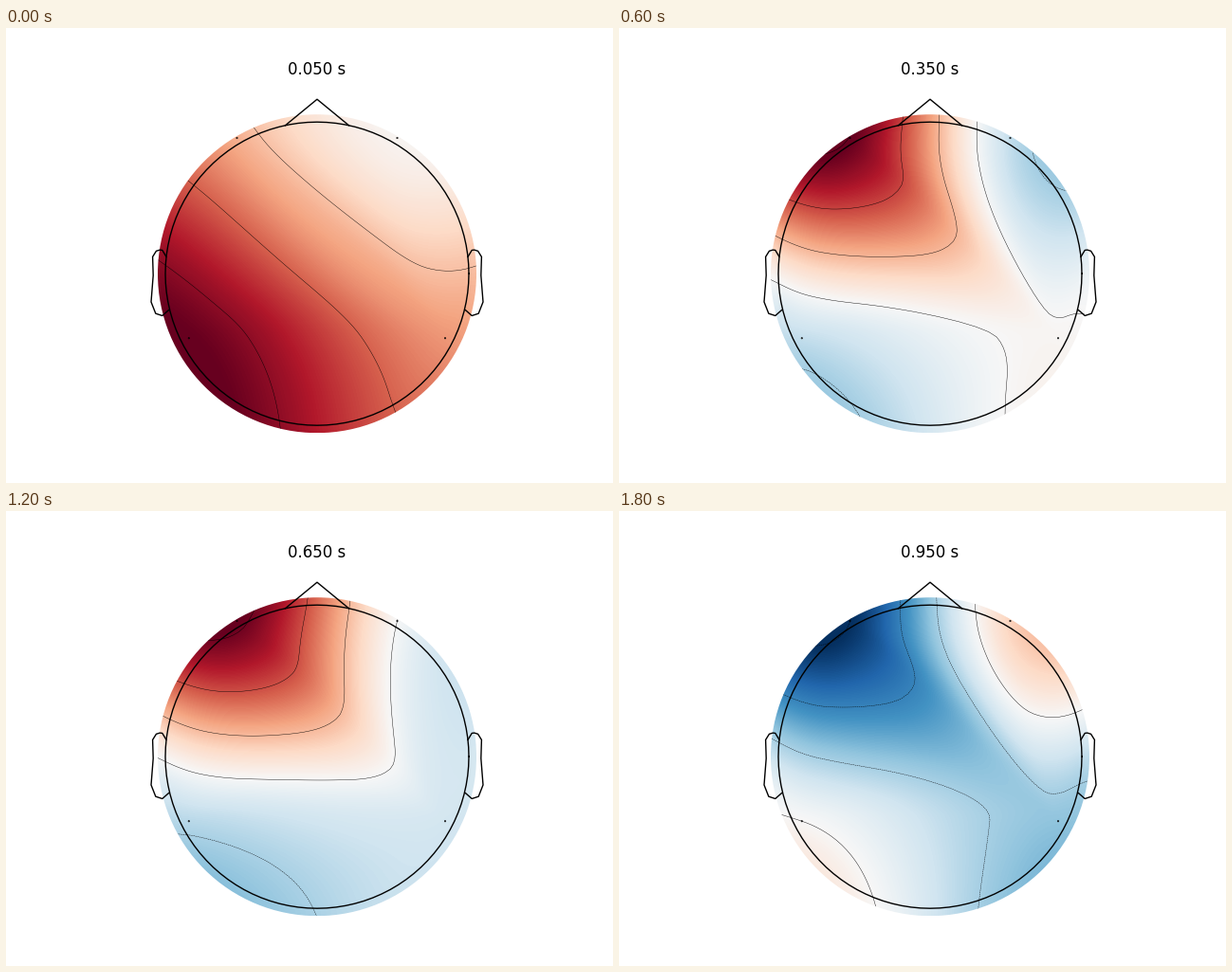
Write a matplotlib script that moves like this. It is 640 px wide and 480 px high and loops after 2000 ms.

```python
import numpy as np
import matplotlib.pyplot as plt
from matplotlib.animation import FuncAnimation
from matplotlib.patches import Circle
from matplotlib.tri import Triangulation

W, H, DPI = 640, 480, 100
CX, CY = 328, 259.2            # head centre on the stage
HEAD, MAP, RING = 160, 168, 427
FRAMES = 10

# Sensors: front left, front right, back left, back right
SENSORS = np.array([(-84.5, 143.2), (84.5, 143.2), (-135.2, -68), (135, -68)])

# Key points of each sensor's signal and of the contour step
KEYS = (0, 2, 4, 6, 7, 8, 9)
SIGNALS = (
    (0.36, 1, 1, 1, 0.88, 1, -1),
    (0.03, -0.47, 0, 0, 0.02, 0.02, 0.22),
    (1, -0.13, -0.34, -0.27, -1, -0.7, 0),
    (0.44, 0.07, -0.03, -0.18, -0.76, -0.17, -0.4),
)
STEPS = (0.297, 0.31, 0.36, 0.32, 0.335, 0.29, 0.333)


def readings(i):
    """Sensor values between the key points, scaled to a peak of 1."""
    values = np.array([np.interp(i, KEYS, s) for s in SIGNALS])
    return values / np.abs(values).max()


class ScalpField:
    """Clough-Tocher interpolation of the sensors, padded by an outer ring."""

    def __init__(self, res=64):
        ang = np.arange(12) * np.pi / 6
        ring = RING * np.c_[np.cos(ang), np.sin(ang)]
        self.pts = np.vstack([SENSORS, ring])
        self.tri = Triangulation(*self.pts.T)
        axis = np.linspace(-MAP, MAP, res)
        self.x, self.y = np.meshgrid(axis, axis)
        self.find_cells()
        self.build_gradient_system()

    def bary(self, t, p):
        a, b, c = (self.pts[self.tri.triangles[t, k]] for k in range(3))
        u, v, w = b - a, c - a, p - a
        det = u[:, 0] * v[:, 1] - u[:, 1] * v[:, 0]
        l1 = (w[:, 0] * v[:, 1] - w[:, 1] * v[:, 0]) / det
        l2 = (u[:, 0] * w[:, 1] - u[:, 1] * w[:, 0]) / det
        return np.array([1 - l1 - l2, l1, l2])

    def find_cells(self):
        cells = self.tri.get_trifinder()(self.x, self.y).ravel()
        self.verts = self.tri.triangles[cells].T
        b = self.bary(cells, np.c_[self.x.ravel(), self.y.ravel()])
        low = b.min(axis=0)
        self.b, self.b4 = b - low, 3 * low
        # Cross-edge direction: towards the neighbouring centroid
        self.g = []
        centres = self.pts[self.tri.triangles].mean(axis=1)
        for k in range(3):
            i, j = (k + 1) % 3, (k + 2) % 3
            near = self.tri.neighbors[cells, i]
            c = self.bary(cells, centres[near])
            g = (2 * c[j] + c[i] - 1) / (2 - 3 * c[j] - 3 * c[i])
            self.g.append(np.where(near < 0, -0.5, g))

    def edge_pairs(self):
        for p, q in self.tri.edges:
            yield p, q
            yield q, p

    def build_gradient_system(self):
        """Gradients that minimise the curvature along all edges."""
        n = len(self.pts)
        lhs, rhs = np.zeros((2 * n, 2 * n)), np.zeros((2 * n, n))
        for i, j in self.edge_pairs():
            e = self.pts[j] - self.pts[i]
            cube = np.hypot(*e) ** 3
            rows = slice(2 * i, 2 * i + 2)
            lhs[rows, 2 * i:2 * i + 2] += 4 * np.outer(e, e) / cube
            lhs[rows, 2 * j:2 * j + 2] += 2 * np.outer(e, e) / cube
            rhs[rows, j] += 6 * e / cube
            rhs[rows, i] -= 6 * e / cube
        self.slopes = np.linalg.solve(lhs, rhs)

    def pad(self, values):
        """Ring points take the mean of the sensors they touch."""
        n = len(values)
        touch = [[] for _ in self.pts]
        for i, j in self.edge_pairs():
            if j < n <= i:
                touch[i].append(values[j])
        means = [np.mean(t) if t else None for t in touch[n:]]
        rest = np.mean([m for m in means if m is not None])
        return np.array([*values, *(rest if m is None else m for m in means)])

    def __call__(self, values):
        z = self.pad(values)
        grad = (self.slopes @ z).reshape(-1, 2)
        f = z[self.verts]
        pos, slope = self.pts[self.verts], grad[self.verts]
        b, b4 = self.b, self.b4
        p = {(i, j): f[i] + (slope[i] * (pos[j] - pos[i])).sum(axis=1) / 3
             for i in range(3) for j in range(3) if i != j}
        q = [(f[i] + p[i, (i + 1) % 3] + p[i, (i + 2) % 3]) / 3
             for i in range(3)]
        h = []
        for k in range(3):
            i, j = (k + 1) % 3, (k + 2) % 3
            bend = -f[i] + 3 * p[i, j] - 3 * p[j, i] + f[j]
            base = -f[i] + 2 * p[i, j] - p[j, i] + q[i] + q[j]
            h.append((self.g[k] * bend + base) / 2)
        r = [(sum(h) - h[i] + q[i]) / 3 for i in range(3)]
        out = b4 ** 3 * sum(r) / 3
        for i in range(3):
            j, k = (i + 1) % 3, (i + 2) % 3
            out += b[i] ** 3 * f[i]
            out += 3 * b[i] ** 2 * (b[j] * p[i, j] + b[k] * p[i, k])
            out += 3 * b[i] * b4 * (b[i] * q[i] + b4 * r[i])
            out += 6 * b[j] * b[k] * b4 * h[i]
        return out.reshape(self.x.shape)


def draw_head(ax):
    style = dict(color="k", lw=1, zorder=3)
    t = np.linspace(0, 2 * np.pi, 101)
    ax.plot(HEAD * np.cos(t), HEAD * np.sin(t), **style)
    dx = np.deg2rad(12)
    dy = np.sqrt(1 - dx ** 2)
    ax.plot(HEAD * np.array([-dx, 0, dx]),
            HEAD * np.array([dy, 1.15, dy]), **style)
    ear = np.array([(159, 17.8), (163.2, 24.8), (165.8, 25.1), (169.6, 23.9),
                    (173.4, 17.8), (172.8, -1.8), (175, -29.8),
                    (170.2, -42), (163.2, -44.3), (156.5, -38.4)])
    for side in (-1, 1):
        ax.plot(side * ear[:, 0], ear[:, 1], **style)
    ax.scatter(*SENSORS.T, s=0.25, facecolor="none", edgecolor="k",
               lw=1, zorder=3)


fig = plt.figure(figsize=(W / DPI, H / DPI), dpi=DPI, facecolor="white")
ax = fig.add_axes([0, 0, 1, 1])
field = ScalpField()
maps = [field(readings(i)) for i in range(FRAMES)]

image = ax.imshow(maps[0], cmap="RdBu_r", vmin=-1, vmax=1, origin="lower",
                  extent=(-MAP, MAP, -MAP, MAP), interpolation="bilinear")
mask = Circle((0, 0), MAP, transform=ax.transData)
image.set_clip_path(mask)
draw_head(ax)
title = ax.text(0, CY - 49.3, "", ha="center", va="baseline", fontsize=12)
ax.set(xlim=(-CX, W - CX), ylim=(CY - H, CY))
ax.axis("off")
lines = []


def draw(i):
    while lines:
        lines.pop().remove()
    image.set_data(maps[i])
    levels = np.arange(-3, 4) * np.interp(i, KEYS, STEPS)
    contour = ax.contour(field.x, field.y, maps[i], levels=levels,
                         colors="k", linewidths=0.3)
    contour.set_clip_path(mask)
    lines.append(contour)
    title.set_text(f"{0.05 + 0.1 * i:.3f} s")
    return image, title


anim = FuncAnimation(fig, draw, frames=FRAMES, init_func=lambda: [],
                     interval=200, repeat=True, repeat_delay=0)
plt.show()
```
